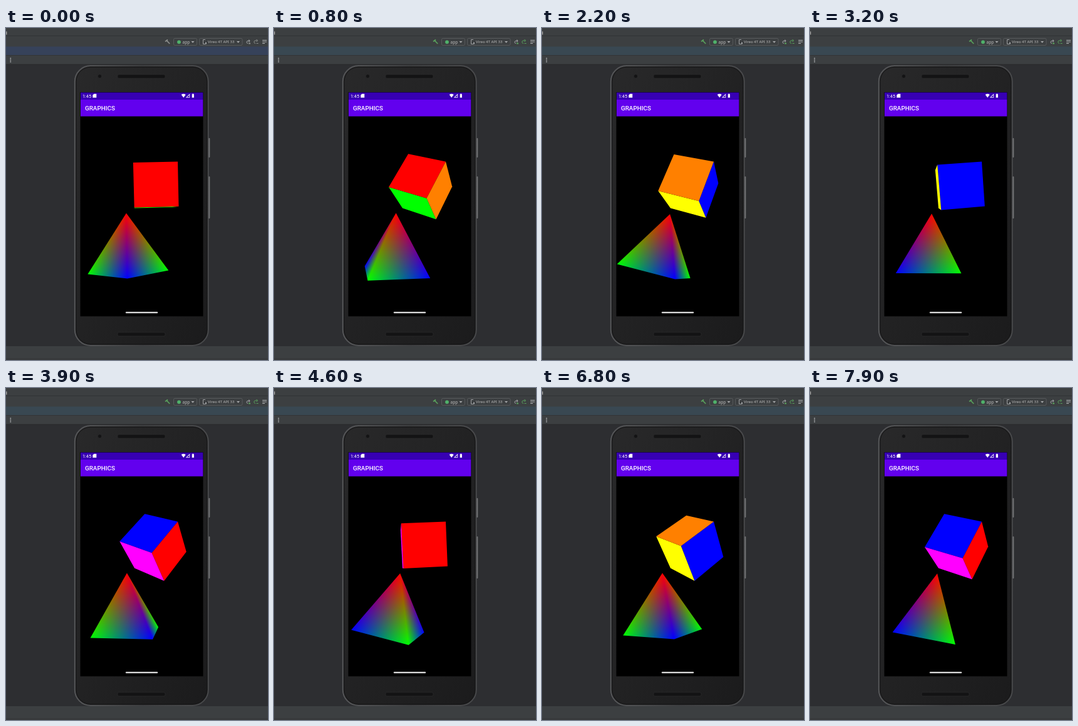
Animation of 418x528 px, one loop 8 s. Source, as an HTML page with a canvas:

```html
<!DOCTYPE html>
<html lang="en">
<head>
<meta charset="utf-8">
<title>Rotating solids</title>
<style>
  html, body { margin: 0; width: 418px; height: 528px; overflow: hidden; background: #2d2e31; }
  svg, canvas { position: absolute; left: 0; top: 0; display: block; }
  canvas { left: 119px; top: 142px; }
  .ui { font-family: "Noto Sans", "Open Sans", sans-serif; fill: #bbbbbb; }
  .phone { font-family: Roboto, sans-serif; fill: #fff; }
  .run { stroke: #59a05c; fill: none; }
  .dim .run { stroke: #8b8e8c; }
  .dim .band { fill: #36425a; }
</style>
</head>
<body>
<svg id="ui" width="418" height="528" viewBox="0 0 418 528">
  <defs>
    <linearGradient id="shell" x1="0" y1="0" x2="1" y2="1">
      <stop offset="0" stop-color="#29292a"/>
      <stop offset="1" stop-color="#1b1b1c"/>
    </linearGradient>
    <linearGradient id="rim" x1="0" y1="0" x2="1" y2="0">
      <stop offset="0" stop-color="#58595b"/>
      <stop offset=".5" stop-color="#3d3e40"/>
      <stop offset="1" stop-color="#4a4b4d"/>
    </linearGradient>
  </defs>

  <!-- editor window -->
  <rect width="418" height="58" fill="#3c3f41"/>
  <rect y="12" width="418" height="1" fill="#303234"/>
  <rect y="5.5" width="1.5" height="5" fill="#999"/>
  <rect class="band" y="29.5" width="418" height="13.5" fill="#394852"/>
  <rect y="43" width="418" height="1" fill="#323436"/>
  <rect y="57.5" width="418" height="1" fill="#28292b"/>
  <g fill="#b5b7b9">
    <rect x="6.5" y="47.5" width="1.6" height="1.6"/>
    <rect x="6.5" y="50.2" width="1.6" height="1.6"/>
    <rect x="6.5" y="52.9" width="1.6" height="1.6"/>
  </g>
  <rect y="506" width="418" height="22" fill="#3c3f41"/>
  <rect y="525" width="418" height="3" fill="#37393b"/>

  <!-- run toolbar -->
  <path class="run" d="M254 21.5l4-3M256.2 19.8l5 5.2" stroke-width="1.7"/>
  <g fill="none" stroke="#5d6062" stroke-width=".8">
    <rect x="267.5" y="16.5" width="37" height="11" rx="2"/>
    <rect x="308.5" y="16.5" width="68.5" height="11" rx="2"/>
  </g>
  <circle cx="276" cy="22.3" r="2.9" fill="#4fb06a"/>
  <text class="ui" x="281.5" y="24.5" font-size="6.5">app</text>
  <path d="M295.5 21h5l-2.5 2.8zM368 21h5l-2.5 2.8z" fill="#a9abad"/>
  <path d="M318 18.5h-3.5v7h4v-3M319.5 23v2.5" fill="none" stroke="#a9abad" stroke-width=".9"/>
  <text class="ui" x="322" y="24.4" font-size="6">Vireo 4T API 33</text>
  <path d="M389 20.5h-3a2 2 0 0 0 0 4M387 18.5l2.2 2-2.2 2" fill="none" stroke="#a5a8aa"/>
  <path class="run" d="M387 24.5h3" stroke-width="2"/>
  <path class="run" d="M401 20h-3a2 2 0 0 0 0 4.5M399.5 18l2 2-2 2M399.5 24.5h3"/>
  <path d="M409 19.5h7M409 22h7M409 24.5h4" stroke="#b3b5b7"/>

  <!-- phone -->
  <g fill="#747577">
    <rect x="323" y="175" width="2.3" height="31" rx="1"/>
    <rect x="323" y="236" width="2.3" height="67" rx="1"/>
  </g>
  <rect x="109.8" y="60" width="212.9" height="445" rx="25" fill="url(#shell)" stroke="url(#rim)" stroke-width="1.8"/>
  <rect x="112" y="62.2" width="208.5" height="440.6" rx="23" fill="none" stroke="#171718"/>
  <g fill="#131314" stroke="#2b2b2d" stroke-width=".7">
    <circle cx="149.5" cy="76.7" r="3"/>
    <rect x="178" y="74" width="76" height="6" rx="2"/>
    <rect x="178" y="484" width="76" height="6" rx="2"/>
  </g>
  <rect x="118.5" y="102" width="196" height="356.5" fill="#000"/>
  <rect x="119" y="102.5" width="195.300" height="11.5" fill="#3700b3"/>
  <rect x="119" y="114" width="195.300" height="26.5" fill="#6200ee"/>
  <text class="phone" x="122" y="110.7" font-size="7.3">1:45</text>
  <path d="M140.300 104.8h4v6h-6v-4z" fill="#fff"/>
  <g transform="translate(-.8)">
    <path d="M280.5 106q3.5-2.6 7 0l-3.5 4.7zM294 104.5v6.2h-6.2z" fill="#fff"/>
    <path d="M289.8 110l3.4-3.5v3.5z" fill="#3700b3"/>
    <path d="M297.500 105.2h.8v-.8h1.6v.8h.8v5.600h-3.200z" fill="#fff"/>
  </g>
  <text class="phone" x="126" y="130.8" font-size="9.85" font-weight="500">GRAPHICS</text>
  <rect x="190.8" y="451.5" width="51.400" height="2" rx="1" fill="#fff"/>
</svg>
<canvas id="view" width="195" height="308"></canvas>
<script>
const LOOP = 8000, STEP = 100;
const FOCAL = 382.7, CX = 97.5, CY = 160;

// time (ms) -> cube angle (degrees)
const KEYS = [[0, -237.5], [800, -280], [2200, -392], [3200, -471.5],
              [4600, -595], [6800, -787.5], [7900, -880]];
const PYRAMID_RATIO = -4 / 3;

const CUBE = { center: [0.617, 1.517, -11.76], axis: [1, 1, 1] };
const PYRAMID = { center: [-0.51, -0.865, -8.5], axis: [0.1, 1, -0.1] };
// +x, -x, +y, -y, +z, -z
const FACE_COLORS = ["#00f", "#0f0", "#f00", "#ff0", "#ff8000", "#f0f"];
const H = 1.04;
const APEX = { pos: [0, H, 0], color: "#f00" };
const BASE = [[-1, -1], [1, -1], [1, 1], [-1, 1]].map(([x, z], i) =>
  ({ pos: [x, -H, z], color: i % 2 ? "#0f0" : "#00f" }));

const ui = document.getElementById("ui");
const ctx = document.getElementById("view").getContext("2d");

const dot = (a, b) => a[0] * b[0] + a[1] * b[1] + a[2] * b[2];
const sub = (a, b) => a.map((v, i) => v - b[i]);
const cross = (a, b) => [a[1] * b[2] - a[2] * b[1], a[2] * b[0] - a[0] * b[2], a[0] * b[1] - a[1] * b[0]];

function angleAt(t) {
  const i = Math.max(1, KEYS.findIndex(k => k[0] >= t));
  const [t0, a0] = KEYS[i - 1], [t1, a1] = KEYS[i];
  return a0 + (a1 - a0) * (t - t0) / (t1 - t0);
}

// Rotate about the solid's axis, then move it into place.
function placer({ center, axis }, degrees) {
  const len = Math.hypot(...axis), u = axis.map(v => v / len);
  const r = degrees * Math.PI / 180, c = Math.cos(r), s = Math.sin(r);
  return p => {
    const side = cross(u, p), along = dot(u, p) * (1 - c);
    return p.map((v, i) => v * c + side[i] * s + u[i] * along + center[i]);
  };
}

const project = ([x, y, z]) => [CX - FOCAL * x / z, CY + FOCAL * y / z];

function facesCamera(pts, center) {
  const n = cross(sub(pts[1], pts[0]), sub(pts[2], pts[0]));
  const outward = Math.sign(dot(n, sub(pts[0], center)));
  return outward * dot(n, pts[0]) < 0;
}

function trace(pts) {
  ctx.beginPath();
  pts.forEach(p => ctx.lineTo(p[0], p[1]));
  ctx.closePath();
}

function drawCube(degrees) {
  const place = placer(CUBE, degrees);
  FACE_COLORS.forEach((color, f) => {
    const axis = f >> 1, sign = f % 2 ? -1 : 1;
    const pts = [[1, 1], [-1, 1], [-1, -1], [1, -1]].map(([a, b]) => {
      const p = [];
      p[axis] = sign;
      p[(axis + 1) % 3] = a;
      p[(axis + 2) % 3] = b;
      return place(p);
    });
    if (!facesCamera(pts, CUBE.center)) return;
    trace(pts.map(project));
    ctx.fillStyle = color;
    ctx.fill();
  });
}

// Each corner adds its colour, fading to black at the opposite edge.
function shadeTriangle(pts, colors) {
  trace(pts);
  pts.forEach((p, i) => {
    const a = pts[(i + 1) % 3], b = pts[(i + 2) % 3];
    const ex = b[0] - a[0], ey = b[1] - a[1];
    const k = ((p[0] - a[0]) * ex + (p[1] - a[1]) * ey) / (ex * ex + ey * ey);
    const g = ctx.createLinearGradient(a[0] + k * ex, a[1] + k * ey, p[0], p[1]);
    g.addColorStop(0, "#000");
    g.addColorStop(1, colors[i]);
    ctx.fillStyle = g;
    ctx.fill();
  });
}

function drawPyramid(degrees) {
  const place = placer(PYRAMID, degrees);
  ctx.globalCompositeOperation = "lighter";
  BASE.forEach((v, i) => {
    const tri = [APEX, v, BASE[(i + 1) % 4]];
    const pts = tri.map(q => place(q.pos));
    if (facesCamera(pts, PYRAMID.center)) shadeTriangle(pts.map(project), tri.map(q => q.color));
  });
  ctx.globalCompositeOperation = "source-over";
}

function render(time) {
  const t = Math.floor((time % LOOP) / STEP) * STEP;
  const angle = angleAt(t);
  ui.classList.toggle("dim", t < STEP);
  ctx.fillStyle = "#000";
  ctx.fillRect(0, 0, 195, 308);
  drawPyramid(angle * PYRAMID_RATIO);
  drawCube(angle);
}

const start = performance.now();
function tick() {
  render(performance.now() - start);
  requestAnimationFrame(tick);
}
tick();
</script>
</body>
</html>
```
